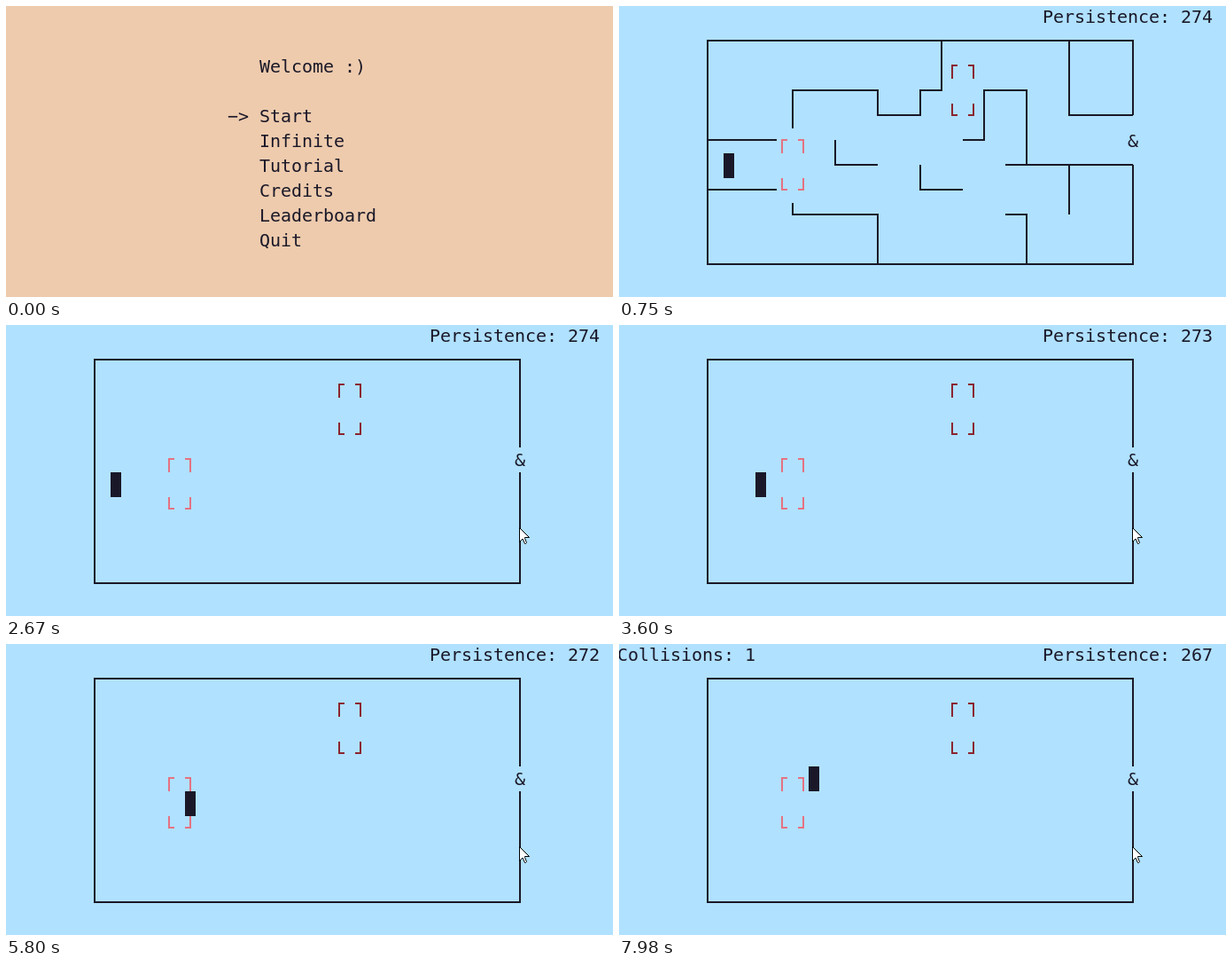
An HTML page with a canvas that plays this animation: 685x328 px, repeating every 8000 ms.

```html
<!DOCTYPE html>
<html lang="en">
<head>
<meta charset="utf-8">
<title>Memory maze</title>
<style>
  html, body { margin: 0; width: 100%; height: 100%; overflow: hidden; }
  canvas { display: block; }
</style>
</head>
<body>
<canvas id="stage" width="685" height="328"></canvas>
<script>
const ctx = document.getElementById('stage').getContext('2d');
const LOOP = 8000;
const CELL_W = 12, CELL_H = 28;
const INK = '#1a1828', PEACH = '#eecbad', SKY = '#b0e1ff', PINK = '#e57283', RED = '#8b2530';

// Timelines: [start in ms, value...]
const player = [
  [0, 10, 6], [3070, 11, 6], [3330, 12, 6], [3600, 13, 6], [3930, 14, 6],
  [4260, 15, 6], [4660, 16, 6], [5800, 17, 6], [6130, 18, 6],
  [6460, 18, 5], [6660, 18, 4], [7980, 18, 5]
];
const persistence = [[0, 274], [3530, 273], [4460, 272], [6130, 271], [6920, 268], [7910, 267]];
const pointer = [[0], [130, 600, 233], [200, 579, 228], [750], [1280, 579, 228]];
const view = [[0, 'menu'], [750, 'maze'], [2670, 'hidden'], [4660, 'ahead'], [5800, 'hidden']];

const walls = new Path2D(`
  M364 39V95H340V123H292V95H196V138 M100 151H178 M100 207H178
  M244 151V179H292 M340 179V207H388 M388 151H412V95H460V179
  M436 179H580 M508 39V123H580 M508 179V235
  M196 222V235H292V291 M436 235H460V291`);
const border = (gapTop, gapBottom) =>
  new Path2D(`M580 ${gapTop}V39H100V291H580V${gapBottom}`);
const openBorder = border(123, 179);
const plainBorder = border(138, 166);
const arrow = new Path2D('M.5 .5V16.5L4 13L6.5 18.5H7.5L8.5 17.5L6.5 12.5V11.5H11.5Z');

const at = (timeline, t) => timeline.findLast(([start]) => start <= t).slice(1);
const cellX = col => col * CELL_W - 2;
const cellY = row => row * CELL_H - 2;

function print(text, col, row) {
  ctx.fillStyle = INK;
  [...text].forEach((char, i) => ctx.fillText(char, cellX(col + i), cellY(row) + 21));
}

function stroke(path, color = INK) {
  ctx.strokeStyle = color;
  ctx.lineWidth = 2;
  ctx.stroke(path);
}

// Four corners around a 3 x 3 cell room
function drawRoom(col, row, color) {
  const left = cellX(col) + 6, right = left + 24;
  const top = cellY(row) + 13, bottom = top + 56;
  const upper = cellY(row + 1), lower = cellY(row + 2);
  stroke(new Path2D(`
    M${left} ${upper}V${top}h6 M${right} ${upper}V${top}h-6
    M${left} ${lower}V${bottom}h6 M${right} ${lower}V${bottom}h-6`), color);
}

function drawMenu() {
  print('Welcome :)', 24, 2);
  print('\u2212>', 21, 4);
  ['Start', 'Infinite', 'Tutorial', 'Credits', 'Leaderboard', 'Quit']
    .forEach((item, i) => print(item, 24, 4 + i));
}

function drawGame(t, mode) {
  stroke(mode === 'maze' ? openBorder : plainBorder);
  if (mode !== 'hidden') {
    ctx.save();
    if (mode === 'ahead') {
      ctx.beginPath();
      ctx.rect(178, 54, 396, 224);
      ctx.clip();
    }
    stroke(walls);
    ctx.restore();
  }
  drawRoom(15, 5, PINK);
  drawRoom(31, 2, RED);
  print('&', 48, 5);
  print(`Persistence: ${at(persistence, t)[0]}`, 40, 0);
  if (t >= 6920) print('Collisions: 1', 0, 0);
  const [col, row] = at(player, t);
  ctx.fillStyle = INK;
  ctx.fillRect(cellX(col), cellY(row), CELL_W, CELL_H);
}

function drawPointer(x, y) {
  ctx.save();
  ctx.translate(x, y);
  ctx.fillStyle = '#fff';
  ctx.fill(arrow);
  ctx.strokeStyle = '#000';
  ctx.lineWidth = 1;
  ctx.stroke(arrow);
  ctx.restore();
}

function draw(t) {
  const [mode] = at(view, t);
  ctx.font = '20px "DejaVu Sans Mono", monospace';
  ctx.fillStyle = mode === 'menu' ? PEACH : SKY;
  ctx.fillRect(0, 0, 685, 328);
  if (mode === 'menu') drawMenu();
  else drawGame(t, mode);
  const spot = at(pointer, t);
  if (spot.length) drawPointer(...spot);
}

const start = performance.now();
function tick() {
  draw((performance.now() - start) % LOOP);
  requestAnimationFrame(tick);
}
tick();
</script>
</body>
</html>
```
